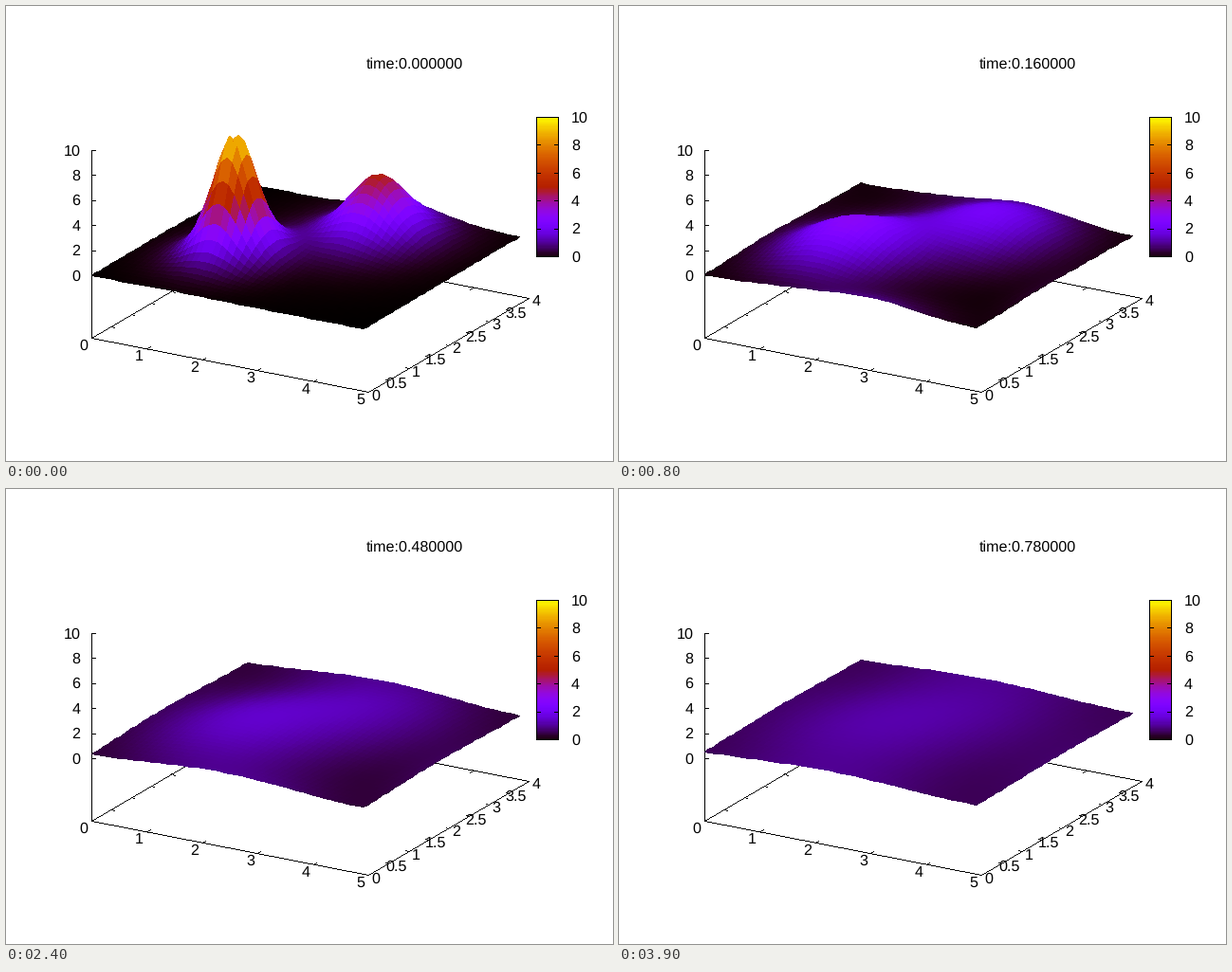
A matplotlib script that plays this animation: 640 by 480 pixels, repeating every 4000 ms.

```python
import numpy as np
import matplotlib.pyplot as plt
from matplotlib.animation import FuncAnimation
from matplotlib.collections import PolyCollection

W, H, DPI = 640, 480, 100
PX = 72 / DPI                      # one pixel in points
FRAMES, STEP_MS, DT = 40, 100, 0.02
NX, NY, CELL = 50, 40, 0.1
FLOOR = -5                         # height of the base plane
Z_MAX = 10

plt.rcParams["font.family"] = "Liberation Sans"
plt.rcParams["text.hinting"] = "none"


def project(x, y, z):
    """Space to pixel position."""
    px = 90.2 + 58.4 * x + 42.15 * y
    py = 284 + 11.43 * x - 24.75 * y - 13.2 * z
    return np.stack(np.broadcast_arrays(px, py), axis=-1)


def palette(v):
    """Black, violet, red, yellow."""
    v = np.clip(v, 0, 1)
    blue = np.clip(np.sin(2 * np.pi * v), 0, 1)
    return np.stack([np.sqrt(v), v ** 3, blue], axis=-1)


# Heat equation on a periodic grid, solved mode by mode
gx, gy = np.meshgrid(np.arange(NX) * CELL, np.arange(NY) * CELL)


def hump(height, cx, cy):
    """Soliton profile: the taller, the narrower."""
    r = np.hypot(gx - cx, gy - cy)
    return height / np.cosh(np.sqrt(height / 2) * r) ** 2


def decay(n):
    return (2 * np.cos(2 * np.pi * np.arange(n) / n) - 2) / CELL ** 2


start = hump(10, 1.5, 1.5) + hump(5, 3, 3)
modes = np.fft.fft2(start)
rates = decay(NY)[:, None] + decay(NX)[None, :]


def heat(t):
    if t == 0:
        return start
    return np.fft.ifft2(modes * np.exp(rates * t)).real


def cells(a):
    """Four corners of each grid cell, far cells first."""
    quads = np.stack([a[:-1, :-1], a[:-1, 1:], a[1:, 1:], a[1:, :-1]], axis=2)
    quads = quads[::-1]
    return quads.reshape(-1, *quads.shape[2:])


fig = plt.figure(figsize=(W / DPI, H / DPI), dpi=DPI, facecolor="white")
ax = fig.add_axes([0, 0, 1, 1])
ax.axis("off")


def lines(segments, order):
    """Hard one-pixel lines on a transparent layer."""
    layer = np.zeros((H, W, 4))
    for p, q in np.rint(segments):
        n = int(np.abs(q - p).max()) + 1
        cols, rows = np.rint(np.linspace(p, q, n)).astype(int).T
        layer[rows, cols, 3] = 1
    ax.imshow(layer, extent=(0, W, H, 0), aspect="auto",
              interpolation="nearest", zorder=order)


def label(x, y, text, align="center"):
    return ax.text(x, y + 5.8, text, ha=align, va="baseline",
                   fontsize=16.1 * PX, color="black", zorder=5)


def tick(p, dx, dy=0):
    return [p, p + np.array([dx, dy])]


def outline(points):
    return [[p, q] for p, q in zip(points, points[1:] + points[:1])]


# Base plane and height axis
base = [project(x, y, FLOOR) for x, y in ((0, 0), (5, 0), (5, 4), (0, 4))]
frame = outline(base) + [[base[0], project(0, 0, Z_MAX)]]

for x in range(6):
    front, back = project(x, 0, FLOOR), project(x, 4, FLOOR)
    if 0 < x < 5:
        frame += [tick(front, 3, -2), tick(back, -3, 2)]
    label(front[0] - 8, front[1] + 7, str(x))

for y in np.arange(0, 4.5, 0.5):
    right, left = project(5, y, FLOOR), project(0, y, FLOOR)
    if 0 < y < 4:
        frame += [tick(right, -3, -1), tick(left, 3, 1)]
    label(right[0] + 8, right[1] + 2.5, f"{y:g}")

for z in range(0, 11, 2):
    p = project(0, 0, z)
    frame.append(tick(p, 4))
    label(78.5, p[1] - 0.3, str(z), "right")
lines(frame, 1)

# Colour bar
LEFT, RIGHT, TOP, BOTTOM = 559, 582, 117, 264
ramp = palette(np.linspace(1, 0, 128))[:, None, :]
ax.imshow(ramp, extent=(LEFT, RIGHT + 1, BOTTOM + 1, TOP),
          aspect="auto", interpolation="nearest", zorder=1)
bar = outline([np.array(c) for c in ((LEFT, TOP), (RIGHT, TOP),
                                     (RIGHT, BOTTOM), (LEFT, BOTTOM))])
for v in range(0, 11, 2):
    y = BOTTOM - (BOTTOM - TOP) * v / Z_MAX
    if 0 < v < Z_MAX:
        bar += [tick(np.array([LEFT, y]), 4), tick(np.array([RIGHT, y]), -4)]
    label(596, y, str(v), "left")
lines(bar, 3)

surface = PolyCollection([], edgecolors="none", linewidths=0,
                         antialiaseds=False, zorder=2)
ax.add_collection(surface, autolim=False)
clock = label(380, 60.5, "", "left")

ax.set_xlim(0, W)
ax.set_ylim(H, 0)


def update(i):
    z = heat(i * DT)
    heights = cells(z)
    inside = heights.max(axis=1) <= Z_MAX      # cells above the range are cut
    points = np.rint(cells(project(gx, gy, z))) + 0.5
    surface.set_verts(points[inside])
    surface.set_facecolor(palette(heights[inside].mean(axis=1) / Z_MAX))
    clock.set_text(f"time:{i * DT:.6f}")
    return surface, clock


anim = FuncAnimation(fig, update, frames=FRAMES, interval=STEP_MS,
                     repeat=True, repeat_delay=0, blit=False)
plt.show()
```
